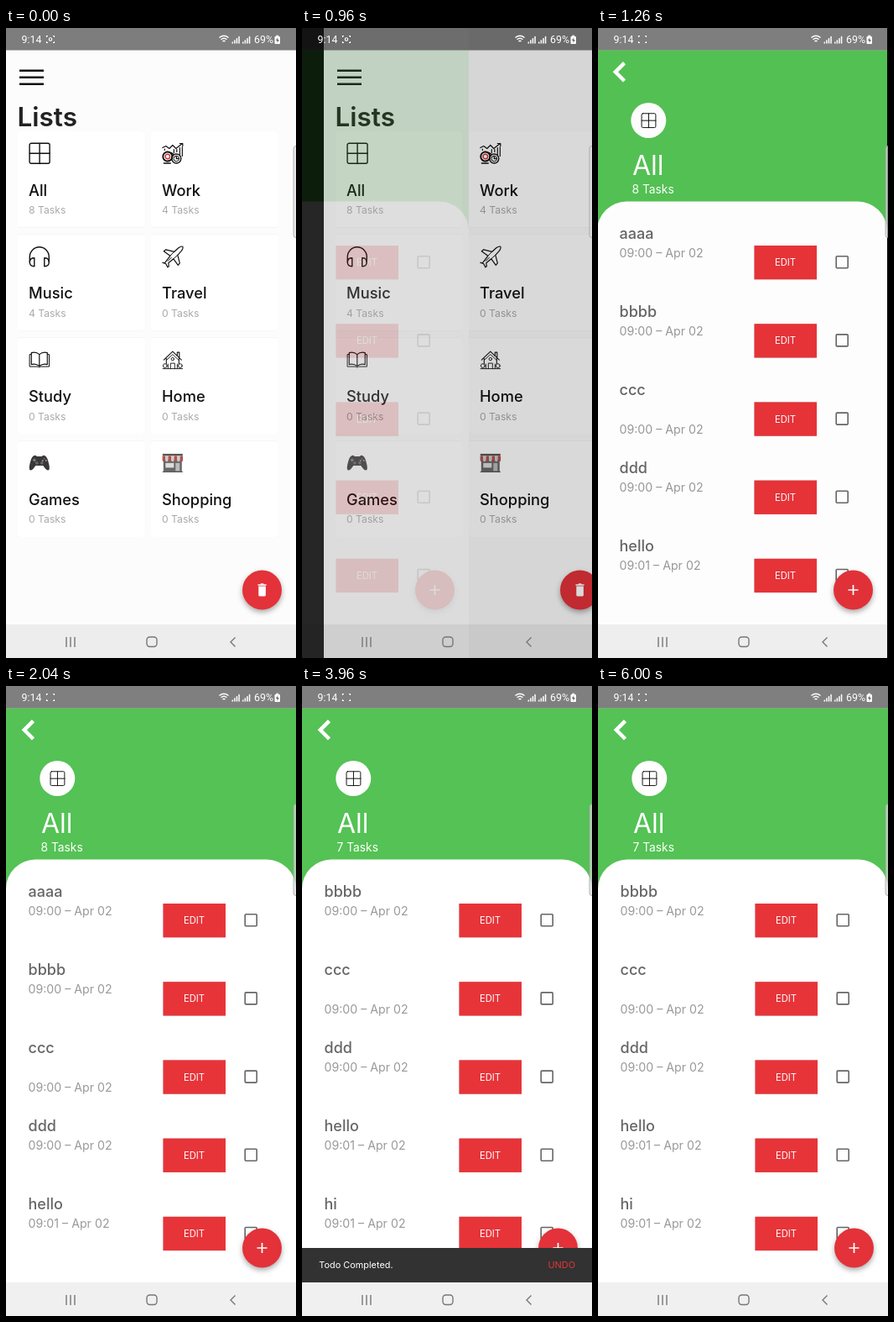
Animation, 346 px wide and 750 px high, one loop 6120 ms. Source, as an HTML page:

```html
<!DOCTYPE html>
<html lang="en">
<head>
<meta charset="utf-8">
<title>Task lists</title>
<style>
  html, body { margin: 0; width: 100%; height: 100%; overflow: hidden; background: #000; }
  svg { display: block; width: 100vw; height: 100vh; font-family: Inter, "Noto Sans", sans-serif; }
  .sys { font: 12.4px Roboto, sans-serif; fill: #fff; }
  .line { fill: none; stroke: #111; stroke-width: 1.4; stroke-linecap: round; stroke-linejoin: round; }
  .card { fill: #fff; filter: drop-shadow(.7px .5px .7px #0002); }
  .fab { fill: #e33239; filter: drop-shadow(0 3px 3px #0005); }
  .button { fill: #e73439; filter: drop-shadow(0 .6px .6px #0004); }
</style>
</head>
<body>
<svg id="stage" viewBox="0 0 346 750" preserveAspectRatio="none"></svg>
<script>
const LOOP = 6120, SHIFT = 173, RED = '#e73439';

const text = (x, y, size, fill, str, weight = 400) =>
  `<text x="${x}" y="${y}" font-size="${size}" fill="${fill}" font-weight="${weight}">${str}</text>`;
const path = (d, extra = '') => `<path d="${d}" ${extra}/>`;
const rect = (x, y, w, h, extra = '') =>
  `<rect x="${x}" y="${y}" width="${w}" height="${h}" ${extra}/>`;
const circle = (x, y, r, extra = '') => `<circle cx="${x}" cy="${y}" r="${r}" ${extra}/>`;
const at = (x, y, body) => `<g transform="translate(${x} ${y})">${body}</g>`;
const lines = body => `<g class="line">${body}</g>`;
const repeat = (n, make) => Array.from({ length: n }, (_, i) => make(i)).join('');

// Icons live in a 25 by 25 box
const icons = {
  All: lines(rect(.8, .8, 24, 24, 'rx="2"') + path('M12.8 1v24M1 12.8h24')),
  Work: lines(
    path('M.5 6l4-2 4 3 4-4 4 4 7.500-6M21 1h3.500v3M3 9V7.500M14 12V8M17.500 11V8M21 14V6M24 16V5', 'stroke-width="1.200"') +
    circle(6.5, 16.5, 5.5, 'stroke-width="2" stroke-dasharray="2.300 1.200"') +
    circle(6.5, 16.5, 2.8, 'stroke="#c33"') +
    circle(17, 19, 5.5) + circle(17, 19, 3.3, 'stroke-width="1"') +
    path('M17 16.500v2.500h2M2 24.500h8M11 12l3 2', 'stroke-width="1.300"')),
  Music: lines(
    path('M1 19v-6a11.500 11.500 0 0 1 23 0v6') +
    path('M6.500 14.500v10q-5.500 0-5.500-5t5.500-5M18.500 14.500v10q5.500 0 5.500-5t-5.500-5')),
  Travel: lines(
    path('M3 20.500L9.500 12 2 6.500l2.500-2 10 2.500 5-4.500q3.500-2.500 5-1.500 1 1.500-1.500 5l-4.500 5 2.500 9.500-2 2.500-5.500-7.500-6 5 .5 4-1.500 1-2-4-4-1.500z', 'stroke-width="1.200"') +
    path('M9.500 12l5-5M13.500 15.500l5-4.500M7 18l4-4', 'stroke-width="1"')),
  Study: lines(
    path('M12.500 6.500Q8.500 3 3 4.500v14q5.500-1.500 9.500 2 4-3.500 9.500-2v-14q-5.500-1.500-9.500 2v14', 'stroke-width="1.200"') +
    path('M3 6.500H.8V21h10l1.700 1 1.700-1h10V6.500H22', 'stroke-width="1"')),
  Home: lines(
    path('M2 13L12.500 3 23 13M5 11.500v6M20 11.500v6M18 8V4h2.500v6', 'stroke-width="1.100"') +
    path('M10 23.500V17h5v6.500M.8 23.500h23.500M5.500 13L12.500 6.500 19.500 13', 'stroke-width=".9"') +
    circle(12.5, 12, 1.7, 'stroke-width=".9"') +
    circle(3.5, 20, 2.4, 'stroke-width=".9"') + circle(21.5, 20, 2.4, 'stroke-width=".9"') +
    path('M7 18v5M18 18v5', 'stroke-width=".9"')),
  Games:
    path('M5.500 4.500q2-1.500 4 .5h6q2-2 4-.5 2.500 1 4.500 10 1.500 7-1 7-2.500 0-6-5.500H8q-3.500 5.500-6 5.500-2.500 0-1-7 2-9 4.500-10z', 'fill="#383838"') +
    path('M4.500 9.500h4M6.500 7.500v4', 'stroke="#888" stroke-width="1.200"') +
    circle(18.5, 7.8, 1, 'fill="#b44"') + circle(20.5, 10, 1, 'fill="#999"') +
    circle(16.5, 10, 1, 'fill="#999"') + circle(9.5, 13, 1.8, 'fill="#666"') + circle(15.5, 13, 1.8, 'fill="#666"'),
  Shopping:
    rect(1.5, 9, 22, 14, 'fill="#686868"') +
    rect(4, 13, 10, 5.5, 'fill="#ddd"') + rect(16, 13, 5, 9.5, 'fill="#bbb"') +
    rect(.5, 2, 24, 2.5, 'fill="#555"') +
    repeat(7, i => path(`M${.3 + i * 3.5} 4.500h3.500v5a1.750 1.750 0 0 1-3.500 0z`, `fill="${i % 2 ? '#ccc' : '#b4514d'}"`)) +
    path('M.5 23.500h24', 'stroke="#555" stroke-width="1.200"')
};

const counts = { All: 8, Work: 4, Music: 4 };
const card = (name, i) => {
  const x = i % 2 ? 173 : 14, y = 123 + 122.8 * (i >> 1), left = x + 13.3;
  return rect(x, y, 151, 114.5, 'rx="2" class="card"') + at(left, y + 13.5, icons[name]) +
    text(left - .3, y + 76.5, 18.3, '#111', name, 500) +
    text(left - .3, y + 98, 12.2, '#aaa', `${counts[name] || 0} Tasks`);
};

const lists = rect(0, 0, 346, 750, 'fill="#fcfcfc"') +
  path('M16 50.700h29M16 58.700h29M16 66.700h29', 'stroke="#111" stroke-width="2.400"') +
  text(13.5, 117, 31.5, '#222', 'Lists', 600) +
  Object.keys(icons).map(card).join('') +
  circle(305.5, 669, 23.5, 'class="fab"') +
  path('M300.500 662.200h2.800l1-1h2.500l1 1h2.800v1.500h-10.100zM301.300 664.500h8.600v10.500q0 1.500-1.500 1.500h-5.600q-1.500 0-1.500-1.500z', 'fill="#fff"');

const row = ([name, time, gap = 0], i) => at(0, 93.2 * i,
  text(26.5, 250.5, 18, '#666', name, 500) +
  text(26.5, 272.6 + gap, 14.2, '#999', `${time} – Apr 02`) +
  rect(187.5, 259, 74.5, 40.3, 'class="button"') +
  text(212, 283.2, 11.2, '#fff', 'EDIT') +
  rect(285.2, 271.7, 14, 14, 'rx="1" fill="none" stroke="#666" stroke-width="1.600"'));

const tasks = [['aaaa', '09:00'], ['bbbb', '09:00'], ['ccc', '09:00', 23.8],
  ['ddd', '09:00'], ['hello', '09:01'], ['hi', '09:01']];
const taskList = (id, first) => `<g id="${id}">` +
  text(41.5, 197, 13.8, '#fff', `${8 - first} Tasks`) +
  tasks.slice(first, first + 5).map(row).join('') + '</g>';

const detail = rect(0, 0, 346, 750, 'fill="#fff"') +
  rect(0, 26.5, 346, 250, 'fill="#54c254"') +
  path('M0 750V241.500a35 35 0 0 1 35-35h276a35 35 0 0 1 35 35v508.500z', 'fill="#fff"') +
  path('M32.500 41.700L21.800 52.300 32.500 63', 'fill="none" stroke="#fff" stroke-width="4.500"') +
  circle(61.3, 110, 21, 'fill="#fff"') +
  at(52.5, 101.2, `<g transform="scale(.7)">${icons.All}</g>`) +
  text(42, 175, 32, '#fff', 'All') +
  taskList('before', 0) + taskList('after', 1) +
  circle(305.5, 669, 23.5, 'class="fab"') +
  path('M299.500 669h12M305.500 663v12', 'stroke="#fff" stroke-width="1.700"') +
  '<g clip-path="url(#body)"><g id="snack">' +
  rect(0, 669, 346, 42, 'fill="#323232"') +
  text(20.3, 693, 10.9, '#fff', 'Todo Completed.') +
  text(293.5, 693, 10.9, RED, 'UNDO') + '</g></g>';

const signal = x => repeat(4, i => rect(x + i * 2.6, 16.5 - i * 2.2, 1.5, 2 + i * 2.2));
const system =
  rect(0, 0, 346, 26.5, 'fill="#000" opacity=".5"') +
  rect(0, 710, 346, 40, 'fill="#000" opacity=".06"') +
  '<g class="sys"><text x="18.500" y="18">9:14</text><text x="296" y="18">69%</text>' +
  signal(269.5) + signal(282) +
  rect(320.5, 10, 6.5, 9, 'rx="1"') + rect(322.2, 8.7, 3, 2) +
  path('M324.500 11l-2.500 4h1.800l-.5 3 2.500-4h-1.800z', 'fill="#555"') + '</g>' +
  '<g fill="none" stroke="#fff" stroke-width="1.100">' +
  path('M48.500 11v-1.500H50M56 9.500h1.500V11M57.500 16v1.500H56M50 17.500h-1.500V16') +
  circle(53, 13.5, 1.7, 'id="rec"') +
  path('M254.500 11.500q5.500-4.500 11 0M256.500 13.800q3.500-3 7 0M258.500 16q1.500-1.300 3 0', 'stroke-width="1.400"') + '</g>' +
  '<g fill="none" stroke="#777" stroke-width="1.400">' +
  path('M72 725v12M77 725v12M82 725v12') + rect(168, 725, 12, 11.5, 'rx="3.500"') +
  path('M273.500 725.500l-5.500 5.500 5.500 5.500') + '</g>' +
  rect(343, 140.5, 9, 109, 'rx="3" fill="#ddd" fill-opacity=".65" stroke="#999" stroke-opacity=".7"');

const $ = id => document.getElementById(id);
$('stage').innerHTML = '<clipPath id="body">' + rect(0, 0, 346, 710) + '</clipPath>' +
  rect(0, 0, 346, 750) + `<g id="lists">${lists}</g><g id="detail">${detail}</g>` + system;

const set = (id, name, value) => $(id).setAttribute(name, value);
const show = (id, on) => set(id, 'visibility', on ? 'visible' : 'hidden');
const ramp = (t, start, span) => Math.min(1, Math.max(0, (t - start) / span));
const ease = k => .5 - .5 * Math.cos(Math.PI * k);

function draw() {
  const t = performance.now() % LOOP;
  const page = ease(ramp(t, 852, 432)), x = Math.round(SHIFT * page);
  set('lists', 'transform', `translate(${x} 0)`);
  set('lists', 'opacity', 1 - page);
  set('detail', 'transform', `translate(${x - SHIFT} 0)`);
  set('detail', 'opacity', page);

  const done = t >= 2400;
  show('before', !done);
  show('after', done);
  show('rec', t < 1100);

  const up = 1 - (1 - ramp(t, 2520, 270)) ** 3, down = ease(ramp(t, 5430, 310));
  set('snack', 'transform', `translate(0 ${42 * (1 - up + down)})`);
  requestAnimationFrame(draw);
}
draw();
</script>
</body>
</html>
```
